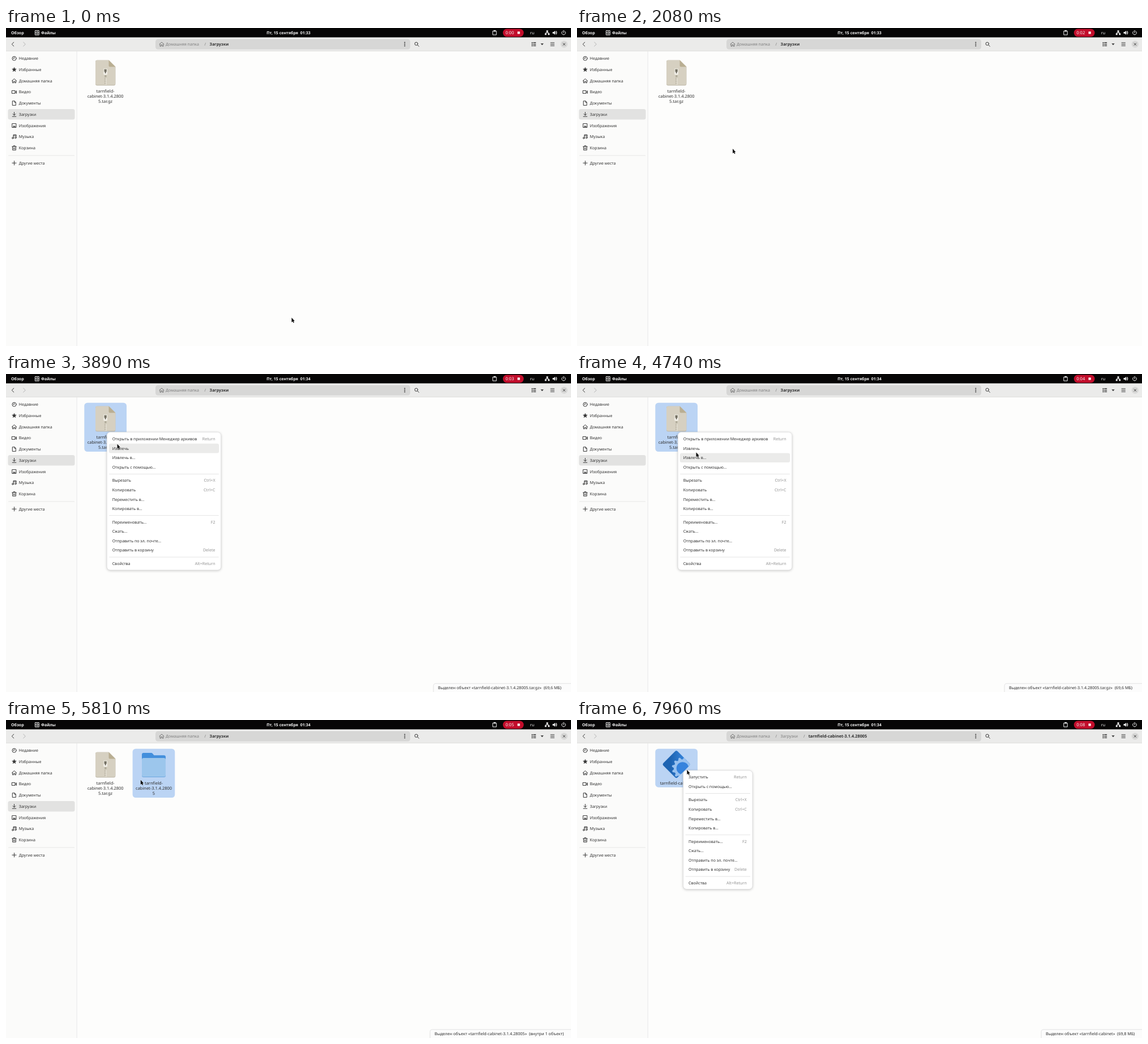
An HTML page that plays this animation: 998x561 px, repeating every 7990 ms.

```html
<!DOCTYPE html>
<html lang="ru">
<head>
<meta charset="utf-8">
<title>Файлы</title>
<style>
  html, body { margin: 0; width: 100%; height: 100%; overflow: hidden; background: #fdfdfd; }
  svg { display: block; width: 100%; height: 100%; }
  text { font-family: "Noto Sans", "Open Sans", sans-serif; font-size: 7px; fill: #2f2f2f;
         white-space: pre; text-rendering: geometricPrecision; }
  .b { font-weight: 700; }
  .w { fill: #f4f4f4; }
  .dim { fill: #7c7c7c; }
  .key { fill: #929292; text-anchor: end; font-size: 7.15px; }
  .mid { text-anchor: middle; }
  .name { text-anchor: middle; font-size: 7.45px; }
  .icon { fill: none; stroke: #363636; stroke-width: 1; stroke-linejoin: round; stroke-linecap: round; }
  .icon .solid { fill: #363636; stroke: none; }
  .light { stroke: #f4f4f4; }
  .light .solid { fill: #f4f4f4; }
  .gray { stroke: #777; }
  .menu { filter: drop-shadow(0 1px 2px rgba(0,0,0,.2)); }
</style>
</head>
<body>
<svg id="stage" viewBox="0 0 998 561" preserveAspectRatio="none"></svg>
<script>
const LOOP = 7990;
const PRODUCT = 'tarnfield-cabinet';
const FOLDER = PRODUCT + '-3.1.4.28005';

// Moments at which the interface reacts
const AT = { menu: 3260, minute: 3700, extract: 5060, folder: 5600, open: 6280, appMenu: 7580 };

// Pointer stops: time, x, y
const STOPS = [
  [90, 504.5, 511], [390, 372, 331], [650, 372, 331], [960, 331, 305], [1130, 331, 305],
  [1910, 290, 218], [1940, 290, 218], [2080, 275, 213], [2350, 275, 213], [3120, 177.5, 101],
  [3500, 177.5, 101], [3930, 197, 124], [3960, 197, 124], [4700, 210.5, 138.2],
  [4770, 210.5, 138.2], [5000, 206, 131], [5100, 206, 131], [5520, 237.8, 105.8],
  [5970, 237.8, 105.8], [6640, 248.8, 97], [6930, 248.8, 97], [7500, 187.5, 88],
  [7860, 187.5, 88], [7960, 194.3, 88]
];

const text = (x, y, s, cls = '', id = '') =>
  `<text x="${x}" y="${y + 2.5}" class="${cls}"${id && ` id="${id}"`}>${s}</text>`;
const rect = (x, y, w, h, fill, r = 0, more = '') =>
  `<rect x="${x}" y="${y}" width="${w}" height="${h}" rx="${r}" fill="${fill}" ${more}/>`;
const icon = (x, y, body, cls = '') =>
  `<g class="icon ${cls}" transform="translate(${x} ${y})">${body}</g>`;
const path = (d, cls = '') => `<path d="${d}" class="${cls}"/>`;
const group = (id, body) => `<g id="${id}">${body}</g>`;

const polar = (r, a) => `${(r * Math.cos(a)).toFixed(2)} ${(r * Math.sin(a)).toFixed(2)}`;
const star = 'M' + Array.from({ length: 10 }, (_, i) =>
  polar(i % 2 ? 2 : 4.6, (i / 5 - .5) * Math.PI)).join('L') + 'Z';
const gear = 'M' + Array.from({ length: 48 }, (_, i) =>
  polar(i % 4 < 2 ? 19 : 15.5, i / 24 * Math.PI)).join('L') + 'Z';

const HOME = path('M-4 0L0-3.6 4 0M-3-.6V3.6H-1V1H1V3.6H3V-.6');
const CHEVRON = 'M1.8-3.5L-1.8 0 1.8 3.5';

function panel() {
  return rect(0, 0, 998, 16.5, '#070606') +
    text(9, 8.2, 'Обзор', 'b w') + text(62, 8.2, 'Файлы', 'b w') +
    icon(55, 8.4, path('M-3.2-3.8H3.2V3.8H-3.2ZM-3.2 0H3.2M-1-1.9H1M-1 1.9H1'), 'light') +
    text(499, 8.2, '', 'b w mid', 'clock') +
    group('clip', icon(863.2, 8.3, path('M-3-3H3V3.8H-3Z') + path('M-1.6-4.4H1.6V-2H-1.6Z', 'solid'), 'light')) +
    `<rect id="pill" y="1.6" height="13.8" rx="6.9" fill="#c20d2b"/>` +
    text(882.2, 8.2, '', 'w', 'timer') + rect(903.5, 6.3, 4.2, 4.2, '#fff') +
    text(925.8, 8.2, 'ru', 'w') +
    icon(956, 8.3, path('M-1.5-4H1.5V-1H-1.5ZM-4.2 1.2H-1.3V4H-4.2ZM1.3 1.2H4.2V4H1.3Z', 'solid') +
      path('M0-1V.2M-2.8 1V.2H2.8V1'), 'light') +
    icon(969.5, 8.3, path('M-4-1.4H-2L.3-3.6V3.6L-2 1.4H-4Z', 'solid') +
      path('M1.5-1.5Q2.4 0 1.5 1.5M2.6-2.9Q4.6 0 2.6 2.9'), 'light') +
    icon(985, 8.3, path('M-1.9-2.7A3.4 3.4 0 1 0 1.9-2.7M0-4V0'), 'light');
}

function header() {
  return rect(0, 16.5, 998, 24.5, '#ebebea') + rect(0, 40.4, 998, .7, '#d9d9d8') +
    icon(12, 28.6, path(CHEVRON)) +
    icon(32.5, 28.6, `<path d="${CHEVRON}" transform="scale(-1 1)" stroke="#b4b4b4"/>`) +
    rect(264, 19.8, 450, 18, '#d7d7d6', 4.5) +
    icon(275, 28.6, HOME, 'gray') + text(282, 28.6, 'Домашняя папка', 'dim') +
    text(350.5, 28.6, '/', 'dim') +
    group('pathDownloads', text(359.6, 28.6, 'Загрузки', 'b')) +
    group('pathFolder', text(359.6, 28.6, 'Загрузки', 'dim') + text(400, 28.6, '/', 'dim') +
      `<text x="408.7" y="31.1" class="b" style="font-size:7.3px">${FOLDER}</text>`) +
    icon(704.3, 28.6, [-3, 0, 3].map(y => `<circle class="solid" cy="${y}" r="1"/>`).join('')) +
    icon(725.5, 28.6, '<circle cx="-.8" cy="-.8" r="2.7"/>' + path('M1.3 1.3L3.8 3.8')) +
    icon(932.3, 28.6, [-2.8, 0, 2.8].map(y =>
      path(`M-3.8 ${y - .9}h1.9v1.8h-1.9zM-1 ${y - .7}h4.8v1.4h-4.8z`, 'solid')).join('')) +
    icon(947, 28.6, path('M-2.7-1.4H2.7L0 1.6Z', 'solid')) +
    icon(965.2, 28.6, path('M-3.2-2.7H3.2M-3.2 0H3.2M-3.2 2.7H3.2')) +
    '<circle cx="985.8" cy="28.6" r="6.2" fill="#d8d8d7"/>' +
    icon(985.8, 28.6, path('M-1.8-1.8L1.8 1.8M1.8-1.8L-1.8 1.8'));
}

function sidebar() {
  const items = [
    ['Недавние', '<circle r="3.6"/>' + path('M0-2V0H-1.7')],
    ['Избранные', path(star, 'solid')],
    ['Домашняя папка', HOME],
    ['Видео', path('M-3.8-2.5H1.5V2.5H-3.8ZM1.8 0L4-2V2Z')],
    ['Документы', path('M-2.8-3.8H.8L2.8-1.6V3.8H-2.8ZM.6-3.6V-1.4H2.6')],
    ['Загрузки', path('M0-3.8V1.6M-2.5-.8L0 1.7 2.5-.8M-3.3 3.8H3.3')],
    ['Изображения', path('M-3.4-3.4H3.4V3.4H-3.4Z') + path('M-2.6 2.4L-.8-.2.5 1.2 1.5.3 2.7 2.4Z', 'solid')],
    ['Музыка', path('M-1.4 2.3V-3.6H3.4V1.6M-1.4-1.8H3.4') +
      '<circle cx="-2.6" cy="2.3" r="1.3"/><circle cx="2.2" cy="1.8" r="1.3"/>'],
    ['Корзина', path('M-3.8-2.4H3.8M-1.4-2.6V-3.8H1.4V-2.6M-2.9-2.2V3.8H2.9V-2.2M-1 0V2M1 0V2')]
  ];
  const row = (y, [label, shape]) => icon(14.5, y, shape) + text(22.8, y, label);
  return rect(0, 41, 125, 520, '#fbfbfa') + rect(124.7, 41, .8, 520, '#e4e4e3') +
    rect(3.5, 143, 118, 18.6, '#e2e2e1', 3.5, 'id="place"') +
    items.map((item, i) => row(53.7 + 19.73 * i, item)).join('') +
    rect(4, 224.6, 117, .8, '#e2e2e1') +
    row(238.2, ['Другие места', path('M-3.6 0H3.6M0-3.6V3.6')]);
}

const label = (x, ...lines) => lines.map((s, i) => text(x, 111.4 + 9.1 * i, s, 'name')).join('');

function files() {
  const teeth = [88, 91, 94, 97].map(y =>
    rect(174, y, 1.6, 1.3, '#aaa594') + rect(176, y + 1.5, 1.6, 1.3, '#f0ede4')).join('');
  const archive = path('') +
    `<path d="M161 56.7H181.5L193.3 68.5V98.5Q193.3 101.5 190.3 101.5H161Q158 101.5 158 98.5V59.7Q158 56.7 161 56.7Z" fill="#bdb7a7"/>
     <path d="M161 56.7H181.5L193.3 68.5V97.5Q193.3 100.5 190.3 100.5H161Q158 100.5 158 97.5V59.7Q158 56.7 161 56.7Z" fill="#d6d0c1"/>
     <path d="M181.5 56.7L193.3 68.5H183.5Q181.5 68.5 181.5 66.5Z" fill="#b9ae92"/>` +
    rect(172.3, 71.5, 6.6, 11, '#f3f1ea', 1) + rect(173.3, 72.5, 4.6, 5, '#8b8778', .6) +
    rect(174.8, 74, 1.6, 6, '#605d53') + rect(174.2, 83.5, 3.2, 3, '#aaa594') + teeth;
  const folder = `<path d="M243 58H256.5Q258 58 259 59.2L261.5 62.2H279Q282 62.2 282 65.2V97H240V61Q240 58 243 58Z" fill="#438fdc"/>` +
    rect(240, 68, 42, 33, '#6fa8e0', 3) + rect(240, 67, 42, 33, '#9cc6ec', 3);
  const app = `<clipPath id="diamond"><rect x="-17.8" y="-17.8" width="35.6" height="35.6" rx="3.5" transform="translate(175.5 78.3) rotate(45)"/></clipPath>
    <g clip-path="url(#diamond)">${rect(150, 53, 52, 52, 'url(#steel)')}
      <path d="${gear}" transform="translate(186.5 85) rotate(8)" fill="#98c1ef"/>
      <circle cx="186.5" cy="85" r="10.8" fill="#3683dd"/></g>`;
  const [brand, rest] = FOLDER.split(/-(.*)/);
  return `<linearGradient id="steel"><stop offset=".3" stop-color="#1e64b2"/><stop offset=".75" stop-color="#3583da"/></linearGradient>` +
    group('downloads',
      rect(138.3, 50.7, 74.7, 86.3, '', 5.5, 'id="archiveBox"') + archive +
      label(175.6, brand + '-', rest.slice(0, -1), rest.slice(-1) + '.tar.gz') +
      group('folder', rect(223.6, 50.7, 74.7, 86.3, '#bbd4f4', 5.5) + folder +
        label(261, brand + '-', rest.slice(0, -1), rest.slice(-1)))) +
    group('inside', rect(138.3, 50.7, 74.7, 68, '', 5.5, 'id="appBox"') + app + label(175.6, PRODUCT));
}

const EDIT = [['Вырезать', 'Ctrl+X'], ['Копировать', 'Ctrl+C'], ['Переместить в…'], ['Копировать в…']];
const MANAGE = [['Переименовать…', 'F2'], ['Сжать…'], ['Отправить по эл. почте…'], ['Отправить в корзину', 'Delete']];
const PROPS = [['Свойства', 'Alt+Return']];
const ROW = 16.65;

function menu(id, x, top, width, height, first) {
  let y = top + 11.8, body = '';
  [first, EDIT, MANAGE, PROPS].forEach((part, i) => {
    if (i) {
      body += rect(x + 4, y - 5, width - 8, .8, '#dfdfdf');
      y += 6.7;
    }
    for (const [name, key] of part) {
      body += text(x + 9.5, y, name) + (key ? text(x + width - 10.2, y, key, 'key') : '');
      y += ROW;
    }
  });
  return group(id, rect(x, top, width, height, '#fff', 6, 'class="menu" stroke="#d9d9d9" stroke-width=".7"') +
    rect(x + 3.5, 0, width - 7, ROW, '#ebebea', 3.5, `id="${id}Row"`) + body);
}

const status = (id, x, s) => group(id,
  `<path d="M${x} 562V550.5Q${x} 546 ${x + 4.5} 546H999V562Z" fill="#fcfcfc" stroke="#dadada" stroke-width=".8"/>
   <text x="${x + 8}" y="556.4" style="font-size:7.15px">Выделен объект ${s}</text>`);

const stage = document.getElementById('stage');
stage.innerHTML = rect(0, 0, 998, 561, '#fdfdfc') + sidebar() + header() + panel() + files() +
  status('statusArchive', 755, `«${FOLDER}.tar.gz»  (69,6 МБ)`) +
  status('statusFolder', 749, `«${FOLDER}»  (внутри 1 объект)`) +
  status('statusApp', 820, `«${PRODUCT}»  (69,8 МБ)`) +
  menu('archiveMenu', 178.2, 102.6, 201.6, 243.3,
    [['Открыть в приложении Менеджер архивов', 'Return'], ['Извлечь'], ['Извлечь в…'], ['Открыть с помощью…']]) +
  menu('appMenu', 187.6, 88.9, 122.4, 209.6, [['Запустить', 'Return'], ['Открыть с помощью…']]) +
  `<path id="pointer" d="M0 0V8.2L1.8 6.6 3.2 9.2 4.5 8.5 3.2 6H5.4Z" fill="#080808" stroke="#fff" stroke-width=".6" paint-order="stroke"/>`;

const el = {};
stage.querySelectorAll('[id]').forEach(node => el[node.id] = node);
const show = (id, on) => el[id].style.display = on ? '' : 'none';
const set = (id, name, value) => el[id].setAttribute(name, value);

function pointerAt(t) {
  const next = STOPS.findIndex(stop => stop[0] > t);
  if (next === 0) return STOPS[0].slice(1);
  if (next < 0) return STOPS[STOPS.length - 1].slice(1);
  const [t0, x0, y0] = STOPS[next - 1], [t1, x1, y1] = STOPS[next];
  const u = (t - t0) / (t1 - t0), e = u * u * (3 - 2 * u);
  return [x0 + (x1 - x0) * e, y0 + (y1 - y0) * e];
}

function render(t) {
  const [x, y] = pointerAt(t);
  const between = (a, b) => t >= a && t < b;
  const hover = bottom => x > 138 && x < 213 && y > 51 && y < bottom;
  const fill = (selected, hovered) => selected ? '#bbd4f4' : hovered ? '#f5f5f6' : 'none';
  const opened = t >= AT.open;
  const archiveSelected = between(AT.menu, AT.folder);
  const appSelected = t >= AT.appMenu;

  set('pointer', 'transform', `translate(${x.toFixed(2)} ${y.toFixed(2)})`);

  const seconds = Math.floor((t + 39) / 1000), shift = seconds === 1 ? 1 : 0;
  el.timer.textContent = '0:0' + seconds;
  set('timer', 'style', 'font-size:7.6px');
  set('pill', 'x', 877.7 + shift);
  set('pill', 'width', 36.8 - shift);
  set('clip', 'transform', `translate(${shift} 0)`);
  el.clock.textContent = 'Пт, 15 сентября\u00a0\u00a001:' + (t < AT.minute ? 33 : 34);

  show('downloads', !opened);
  show('pathDownloads', !opened);
  show('place', !opened);
  show('inside', opened);
  show('pathFolder', opened);
  show('folder', t >= AT.folder);
  set('archiveBox', 'fill', fill(archiveSelected, hover(137)));
  set('appBox', 'fill', fill(appSelected, hover(119)));
  show('statusArchive', archiveSelected);
  show('statusFolder', between(AT.folder, AT.open));
  show('statusApp', appSelected);

  show('archiveMenu', between(AT.menu, AT.extract));
  show('appMenu', appSelected);
  const row = Math.floor((y - 104.8) / ROW);
  show('archiveMenuRow', x > 181 && row >= 0);
  set('archiveMenuRow', 'y', 106.1 + ROW * row);
  show('appMenuRow', false);
}

const start = performance.now();
function tick(now) {
  render(Math.max(0, now - start) % LOOP);
  requestAnimationFrame(tick);
}
render(0);
requestAnimationFrame(tick);
</script>
</body>
</html>
```
